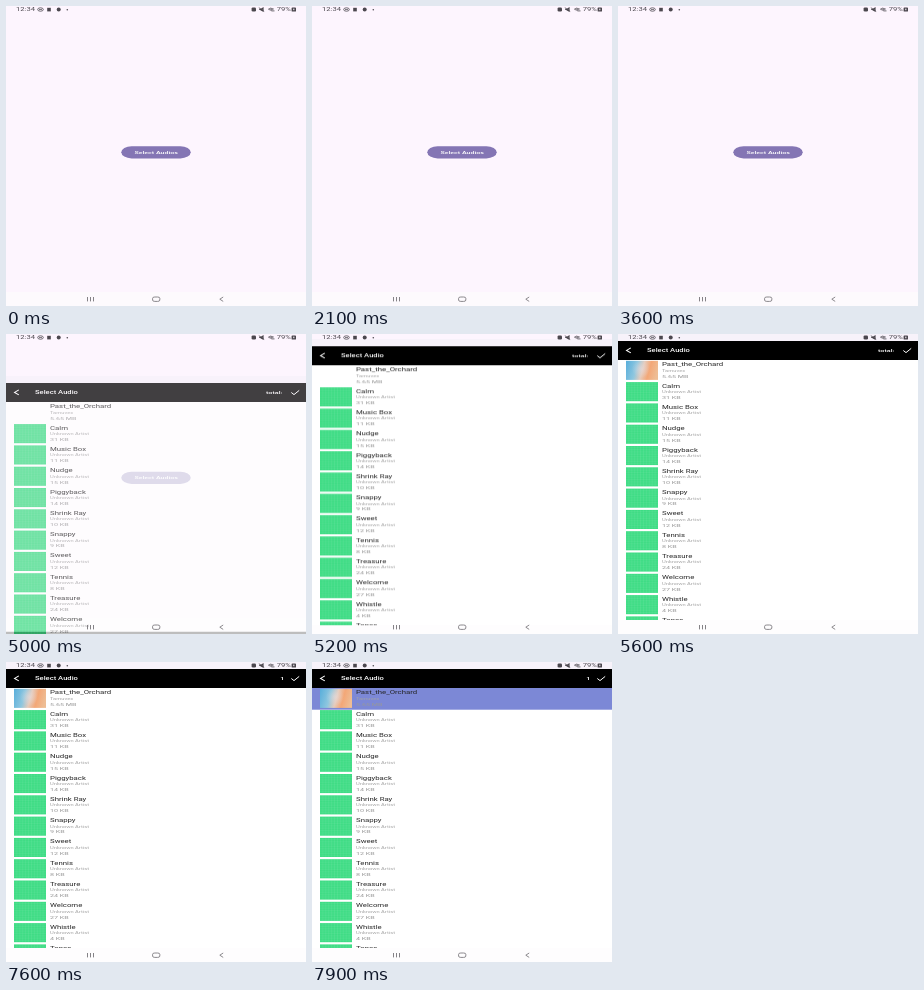
Write an HTML page with a canvas that moves like this. It is 300 by 300 pixels and loops after 8000 ms.

```html
<!DOCTYPE html>
<html lang="en">
<head>
<meta charset="utf-8">
<title>Select audio</title>
<style>
html, body { margin: 0; width: 100%; height: 100%; overflow: hidden; background: #fdf5fe; }
canvas { display: block; width: 300px; height: 300px; }
</style>
</head>
<body>
<canvas id="stage"></canvas>
<script>
const LOOP = 8000, STEP = 100, SIZE = 300;
const OPEN = 5000, COVER = 5300, COUNT = 7000, SELECT = 7900;
const ASPECT = 1.69; // the screen is shown wider than it is
const ROW = 21.3, BAR_TOP = 7, LIST_TOP = 26, NAV_TOP = 286, ART = 19.1;
const tracks = [
  ['Past_the_Orchard', '5.65 MB', 'Tamuvex'], ['Calm', '31 KB'], ['Music Box', '11 KB'],
  ['Nudge', '15 KB'], ['Piggyback', '14 KB'], ['Shrink Ray', '10 KB'], ['Snappy', '9 KB'],
  ['Sweet', '12 KB'], ['Tennis', '8 KB'], ['Treasure', '24 KB'], ['Welcome', '27 KB'],
  ['Whistle', '4 KB'], ['Tones', '6 KB']
];

const scale = Math.max(1, window.devicePixelRatio || 1);
function prepare(canvas) {
  canvas.width = canvas.height = SIZE * scale;
  const c = canvas.getContext('2d');
  c.scale(scale, scale);
  return c;
}
const stage = prepare(document.getElementById('stage'));
const layer = document.createElement('canvas');
const sheet = prepare(layer);

function rect(c, x, y, w, h, color) {
  c.fillStyle = color;
  c.fillRect(x, y, w, h);
}

// corners are stretched like everything else
function pill(c, x, y, w, h, r) {
  c.beginPath();
  c.roundRect(x, y, w, h, { x: r * ASPECT, y: r });
}

function dot(c, x, y, r, color) {
  c.fillStyle = color;
  c.beginPath();
  c.arc(x, y, r, 0, Math.PI * 2);
  c.fill();
}

function line(c, color, width, ...points) {
  c.strokeStyle = color;
  c.lineWidth = width;
  c.beginPath();
  points.forEach(([x, y]) => c.lineTo(x, y));
  c.stroke();
}

function text(c, str, x, y, size, color, weight = 400, align = 'left') {
  c.save();
  c.translate(x, y);
  c.scale(ASPECT, 1);
  c.font = `${weight} ${size}px Roboto, sans-serif`;
  c.textAlign = align;
  c.fillStyle = color;
  c.fillText(str, 0, 0);
  c.restore();
}

function statusBar(c) {
  const ink = '#4b474e';
  text(c, '12:34', 10, 5.2, 4.5, ink);
  c.strokeStyle = ink;
  c.lineWidth = 0.8;
  c.beginPath();
  c.ellipse(34.5, 3.5, 2.8, 1.7, 0, 0, Math.PI * 2);
  c.stroke();
  line(c, ink, 0.7, [33, 3.5], [36, 3.5]);
  rect(c, 41.2, 1.8, 3.6, 3.6, ink);
  dot(c, 52.7, 3.5, 2, ink);
  dot(c, 61.3, 3.7, 0.8, ink);

  c.fillStyle = ink;
  pill(c, 245.6, 1.6, 4.4, 3.9, 0.8);
  c.fill();
  line(c, ink, 1.2, [253.2, 3.4], [254.6, 3.4], [257, 2], [257, 4.9], [254.6, 3.6]);
  line(c, ink, 0.7, [252.8, 1.6], [258.2, 5.4]);
  c.strokeStyle = ink;
  c.lineWidth = 0.7;
  for (const r of [1.3, 2.5, 3.7]) {
    c.beginPath();
    c.ellipse(265, 5.1, r, r / 1.3, 0, Math.PI * 1.2, Math.PI * 1.8);
    c.stroke();
  }
  line(c, ink, 0.8, [265.4, 4.9], [268.5, 4.9]);
  text(c, '79%', 270.8, 5.2, 4.5, ink);
  pill(c, 285.6, 1.6, 4.4, 3.9, 0.5);
  c.fillStyle = ink;
  c.fill();
  rect(c, 287.2, 2.6, 1.2, 1.6, '#e9e3ec');
}

function navIcons(c) {
  const ink = '#777479';
  for (const x of [81.5, 84.5, 87.5]) line(c, ink, 0.9, [x, 291], [x, 295.4]);
  c.strokeStyle = ink;
  c.lineWidth = 0.85;
  pill(c, 146.6, 291, 7.2, 4.4, 1.3);
  c.stroke();
  line(c, ink, 0.85, [217.2, 291], [213.8, 293.2], [217.2, 295.4]);
}

function home(c, t) {
  rect(c, 0, 0, SIZE, SIZE, '#fdf5fe');
  rect(c, 0, NAV_TOP, SIZE, SIZE - NAV_TOP, '#fdfafd');
  pill(c, 115.3, 140.2, 69.4, 12.2, 6.1);
  c.fillStyle = '#8475b4';
  c.fill();
  const press = (t - 3000) / 600;
  if (press >= 0 && press < 1) {
    c.save();
    c.clip();
    dot(c, 150, 146.3, 12 + 40 * press, `rgba(255,255,255,${0.14 * (1 - press)})`);
    c.restore();
  }
  text(c, 'Select Audios', 150.2, 147.9, 4.2, '#fff', 500, 'center');
}

function cover(c, y) {
  const sky = c.createLinearGradient(8, y, 40, y + 9);
  [[0, '#58aedb'], [0.35, '#8fc7df'], [0.55, '#e5cbbb'], [0.75, '#f3a777'], [1, '#eebd94']]
    .forEach(([at, color]) => sky.addColorStop(at, color));
  rect(c, 8, y, 32, ART, sky);
  const glow = c.createRadialGradient(23, y + 8, 0, 23, y + 8, 9);
  glow.addColorStop(0, 'rgba(232,222,226,.55)');
  glow.addColorStop(1, 'rgba(232,222,226,0)');
  rect(c, 8, y, 32, ART, glow);
}

function placeholder(c, y) {
  rect(c, 8, y, 32, ART, '#3ddc84');
  const grid = 'rgba(255,255,255,.2)';
  for (let i = 1; i < 11; i++) {
    const x = 8 + i * 32 / 11, v = y + i * ART / 11;
    line(c, grid, 0.35, [x, y], [x, y + ART]);
    line(c, grid, 0.3, [8, v], [40, v]);
  }
}

function track(c, [name, size, artist = 'Unknown Artist'], i, t) {
  const y = LIST_TOP + i * ROW;
  if (i === 0 && t >= SELECT) rect(c, 0, y, SIZE, ROW + 0.4, '#7c88d6');
  if (i > 0) placeholder(c, y + 0.8);
  else if (t >= COVER) cover(c, y + 0.8);
  text(c, name, 44, y + 6.3, 4.62, '#242424');
  text(c, artist, 44, y + 11.7, 3.4, '#a3a3a3');
  text(c, size, 44, y + 17.6, 4.26, '#989898');
}

function picker(c, t) {
  rect(c, 0, 0, SIZE, SIZE, '#fff');
  rect(c, 0, 0, SIZE, BAR_TOP, '#f7f2fa');
  tracks.forEach((item, i) => track(c, item, i, t));
  rect(c, 0, BAR_TOP, SIZE, LIST_TOP - BAR_TOP, '#000');
  line(c, '#fff', 1.1, [12.8, 13.9], [8.6, 16.4], [12.8, 18.9]);
  text(c, 'Select Audio', 29, 18.2, 4.5, '#fff', 500);
  text(c, t < COUNT ? 'total:' : '1', t < COUNT ? 260 : 274.2, 18.2, 4.26, '#fff', 500);
  line(c, '#fff', 1, [285.3, 16.5], [288, 18.6], [293.2, 14.4]);
  rect(c, 0, NAV_TOP, SIZE, SIZE - NAV_TOP, '#fefdfe');
}

function draw(t) {
  const u = Math.max(0, Math.min(1, (t - OPEN) / 400));
  rect(stage, 0, 0, SIZE, SIZE, '#000');
  stage.save();
  if (t >= OPEN) stage.translate(0, -2.5 - 10 * u);
  home(stage, t);
  stage.restore();
  if (t >= OPEN) {
    picker(sheet, t);
    // the nav strip slides with the new window
    stage.globalAlpha = Math.min(1, 0.74 + 0.52 * u);
    stage.drawImage(layer, 0, 42 * (1 - u) ** 3, SIZE, SIZE);
    stage.globalAlpha = 1;
  }
  statusBar(stage);
  navIcons(stage);
}

const start = performance.now();
function frame() {
  const t = (performance.now() - start) % LOOP;
  draw(Math.floor(t / STEP) * STEP);
  requestAnimationFrame(frame);
}
frame();
</script>
</body>
</html>
```
